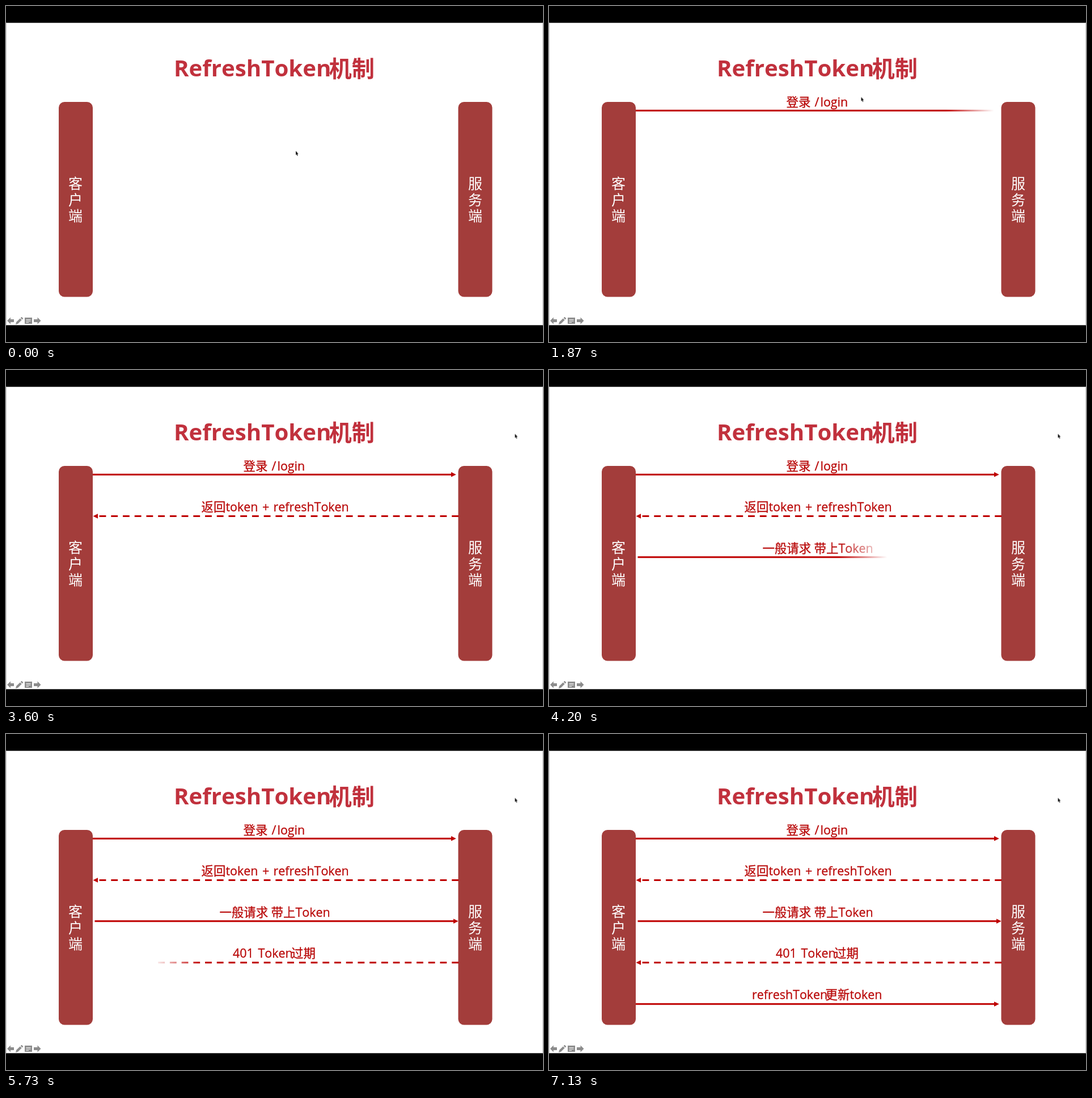
An HTML page for the animation above (8000 ms loop, 947 by 592 pixels).

```html
<!DOCTYPE html>
<html lang="zh-CN">
<head>
<meta charset="utf-8">
<title>RefreshToken机制</title>
<style>
@property --front { syntax: "<length>"; inherits: false; initial-value: 150px; }

html, body { margin: 0; width: 100%; height: 100%; overflow: hidden; background: #000; }
svg { position: absolute; left: 0; top: 0; width: 947px; height: 592px; }
text { font-family: "Open Sans", "Noto Sans CJK SC", "Noto Sans CJK", "Noto Sans", sans-serif; font-kerning: none; }

.title { font-size: 40.2px; font-weight: 700; fill: #c1313d; }
.bar { fill: #a33d3b; }
.side { font-size: 25px; fill: #fff; text-anchor: middle; }
.icons { fill: #8c8c8c; }

/* Each message is wiped in behind a soft edge, along its arrow. */
.row {
  --feather: 85px;
  --dir: 90deg;
  -webkit-mask-image: linear-gradient(var(--dir), #000 calc(var(--front) - var(--feather)), transparent var(--front));
  mask-image: linear-gradient(var(--dir), #000 calc(var(--front) - var(--feather)), transparent var(--front));
  animation: 8s linear infinite;
}
.row text { font-size: 21.4px; fill: #b90808; stroke: #b90808; stroke-width: 0.3; }
.row path { stroke: #bf0000; stroke-width: 2.96; fill: none; marker-end: url(#head); }
.reply { --dir: 270deg; }
.reply path { stroke-dasharray: 11.84 8.88; }

.login   { animation-name: login; }
.issue   { animation-name: issue; }
.request { animation-name: request; }
.expired { animation-name: expired; }
.renew   { animation-name: renew; }

@keyframes login   { 0%, 17.97% { --front: 150px } 24.22%, 100% { --front: 882px } }
@keyframes issue   { 0%, 32.97% { --front: 150px } 39.22%, 100% { --front: 882px } }
@keyframes request { 0%, 48.7%  { --front: 150px } 54.95%, 100% { --front: 882px } }
@keyframes expired { 0%, 67.05% { --front: 150px } 73.3%, 100%  { --front: 882px } }
@keyframes renew   { 0%, 82.84% { --front: 150px } 89.09%, 100% { --front: 882px } }

.cursor { animation: point 8s linear infinite; }
@keyframes point {
  0%, 0.4%       { transform: translate(511px, 255.5px) }
  3.375%, 12.6%  { transform: translate(545.5px, 148.5px) }
  15%, 24.25%    { transform: translate(550.5px, 160.5px) }
  28.4%          { transform: translate(553.5px, 231px) }
  29.1%, 33%     { transform: translate(554px, 232px); animation-timing-function: ease-out }
  36.6%          { transform: translate(872px, 118.5px); animation-timing-function: ease-out }
  42.5%, 43.3%   { transform: translate(896.5px, 113.5px) }
  45%, 100%      { transform: translate(897.5px, 112.5px) }
}
</style>
</head>
<body>
<svg viewBox="0 0 947 592">
  <defs>
    <marker id="head" markerWidth="3" markerHeight="3" refX="0.1" refY="1.5" orient="auto">
      <path d="M0 0L3 1.5L0 3Z" style="fill:#bf0000;stroke:none;marker:none"/>
    </marker>
  </defs>
  <rect y="29.65" width="947" height="532.7" fill="#fff"/>
  <path d="M0.5 29.65V562.35M946.5 29.65V562.35" stroke="#cfcfcf"/>
  <text class="title" y="124"><tspan x="296">RefreshToken</tspan><tspan x="569.5" y="125">机制</tspan></text>

  <rect class="bar" x="93" y="169" width="60" height="343.5" rx="10"/>
  <rect class="bar" x="797.5" y="169" width="60" height="343.5" rx="10"/>
  <text class="side"><tspan x="122.5" y="322.3">客</tspan><tspan x="122.5" y="350.6">户</tspan><tspan x="122.5" y="378.9">端</tspan></text>
  <text class="side"><tspan x="827.5" y="322.3">服</tspan><tspan x="827.5" y="350.6">务</tspan><tspan x="827.5" y="378.9">端</tspan></text>

  <g class="icons">
    <path d="M2 554.5L8 548.5V552H14V557H8V560.5Z"/>
    <path d="M17 561L18.2 556.8L24.8 550.4L27.7 553.3L21.2 559.8ZM25.7 549.5L27.6 547.8L30.4 550.6L28.6 552.4Z"/>
    <path d="M33 549H46V560H33Z"/>
    <path d="M35.5 552.5H43.5M35.5 555H43.5M35.5 557.5H40" stroke="#fff"/>
    <path d="M61.5 554.5L55.5 548.5V552H49V557H55.5V560.5Z"/>
  </g>
</svg>

<svg class="row login" viewBox="0 0 947 592">
  <text y="176.5"><tspan x="418.5">登录</tspan><tspan x="468.5">/</tspan><tspan x="478.5">login</tspan></text>
  <path d="M153 184.2H785.2"/>
</svg>
<svg class="row reply issue" viewBox="0 0 947 592">
  <text y="249.2"><tspan x="344.5">返回</tspan><tspan x="387.5">token</tspan><tspan x="452">+</tspan><tspan x="471.5">refreshToken</tspan></text>
  <path d="M798 257.5H162"/>
</svg>
<svg class="row request" viewBox="0 0 947 592">
  <text y="321.6"><tspan x="376.5">一般请求</tspan><tspan x="467.5">带上</tspan><tspan x="510.5">Token</tspan></text>
  <path d="M156.5 329.8H789"/>
</svg>
<svg class="row reply expired" viewBox="0 0 947 592">
  <text y="394.2"><tspan x="400">401</tspan><tspan x="444.5">Token</tspan><tspan x="503">过期</tspan></text>
  <path d="M798 402.7H162"/>
</svg>
<svg class="row renew" viewBox="0 0 947 592">
  <text y="467"><tspan x="358">refreshToken</tspan><tspan x="487.5">更新</tspan><tspan x="530.5">token</tspan></text>
  <path d="M153 475.8H785.2"/>
</svg>

<svg viewBox="0 0 947 592">
  <path class="cursor" d="M0 0V7L1.5 5.7L2.6 8.4L3.8 7.9L2.7 5.3H4.8Z" fill="#111" stroke="#fff" stroke-width="0.8" paint-order="stroke"/>
</svg>
</body>
</html>
```
